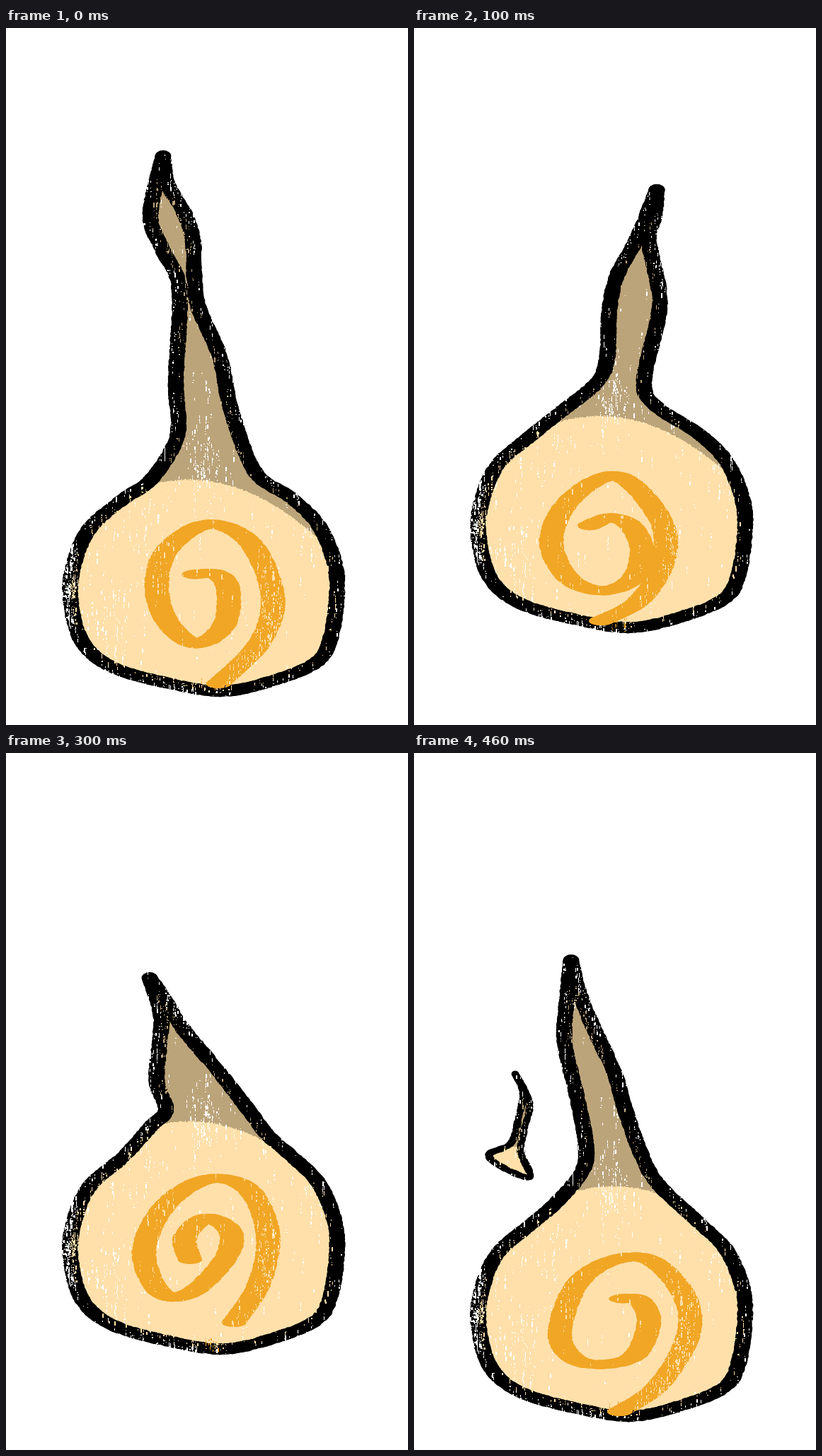
Write an HTML page with a canvas that moves like this. It is 568 px wide and 986 px high and loops after 0.5 s.

```html
<!DOCTYPE html>
<html lang="en">
<head>
<meta charset="utf-8">
<title>Flame</title>
<style>
html, body { margin: 0; width: 100%; height: 100%; overflow: hidden; background: #fff; }
canvas { display: block; }
</style>
</head>
<body>
<canvas id="stage" width="568" height="986"></canvas>
<script>
const W = 568, H = 986, STEP = 100;
const CREAM = '#ffe0aa', TAN = '#bca47a', ORANGE = '#f1a625', INK = '#000';

// Half width and half height of each elliptical brush.
const BODY_NIB = [11, 7.5], WISP_NIB = [5, 4], SPIRAL_NIB = [17, 6];

// All poses share one bowl, moved up by lift, from right shoulder to left.
const bowl = '402,664 442,704 465,760 467,810 458,865 440,896 390,919 310,938 230,927 150,904 107,867 91,805 97,755 119,707 165,667';

// Necks: right side runs down from the tip, left side back up to it.
const poses = [
  {
    lift: 0, light: [258, 638],
    right: '222,181 228,220 252,262 264,300 266,350 272,395 302,465 318,540 352,628',
    left: '203,641 235,595 244,560 240,500 245,370 222,315 204,265 222,181',
    spiral: '300,928 358,870 377,805 345,728 285,702 228,738 213,790 228,840 268,871 308,845 314,795 298,773 266,773'
  },
  {
    lift: 90, light: [262, 548],
    right: '343,229 340,265 332,300 346,370 345,410 325,500 342,535',
    left: '205,545 258,502 273,465 276,400 287,350 315,298 343,229',
    spiral: '264,839 318,810 352,755 348,695 288,634 222,666 194,725 218,778 265,796 308,780 322,738 305,703 276,693 248,704'
  },
  {
    lift: 160, light: [258, 467],
    right: '336,194 349,235 340,285 316,345 311,390 322,430 350,470',
    left: '213,455 226,425 211,350 230,320 270,290 305,245 336,194',
    spiral: '311,741 345,695 355,610 318,532 262,514 190,550 174,610 200,670 250,688 302,666 318,620 300,590 270,585 251,604 257,626',
    wisp: { line: '316,24 343,55 366,100 368,128 343,143 337,157 316,146 316,122 330,90 328,55 316,24', light: [340, 110] }
  },
  {
    lift: 95, light: [258, 520],
    right: '203,318 225,350 250,390 300,450 345,508 370,541',
    left: '205,528 226,505 213,465 217,410 219,370 203,318',
    spiral: '322,806 358,750 370,680 342,617 285,603 225,640 195,705 218,763 262,763 310,715 317,677 283,658 253,685 260,717'
  },
  {
    lift: 0, light: [280, 612],
    right: '222,293 232,335 252,385 283,452 297,500 320,565 345,610',
    left: '200,637 237,593 243,555 230,485 213,410 216,350 222,293',
    spiral: '290,932 345,895 387,825 382,768 335,718 280,718 230,752 206,820 225,856 265,865 312,852 332,805 318,774 292,772',
    wisp: { line: '143,454 163,495 155,535 151,565 164,600 125,586 106,568 137,552 148,515 154,480 143,454', light: [140, 556] }
  }
];

// Worn patches: x, y, spread x, spread y, streak count.
const inkWear = [[90, 780, 7, 40, 170], [240, 928, 60, 12, 80], [150, 668, 30, 22, 50]];
const fillWear = [[278, 620, 14, 35, 65], [150, 850, 22, 38, 75], [436, 710, 9, 24, 25], [180, 690, 35, 25, 30]];
const spiralWear = [[375, 830, 14, 50, 200], [340, 900, 25, 22, 70], [225, 740, 22, 25, 35]];

let seed = 1;
function rand() {
  seed = (seed + 0x6D2B79F5) | 0;
  let t = Math.imul(seed ^ (seed >>> 15), 1 | seed);
  t = (t + Math.imul(t ^ (t >>> 7), 61 | t)) ^ t;
  return ((t ^ (t >>> 14)) >>> 0) / 4294967296;
}
const bell = () => (rand() + rand() + rand() + rand() - 2) * 1.7;

const points = text => text.split(' ').map(p => p.split(',').map(Number));

function layer() {
  const c = document.createElement('canvas');
  c.width = W;
  c.height = H;
  return c.getContext('2d');
}

// Catmull-Rom curve through the key points, sampled about every 2 px.
function smooth(keys) {
  const at = i => keys[Math.max(0, Math.min(keys.length - 1, i))];
  const out = [];
  for (let i = 0; i < keys.length - 1; i++) {
    const [a, b, c, d] = [at(i - 1), at(i), at(i + 1), at(i + 2)];
    const steps = Math.ceil(Math.hypot(c[0] - b[0], c[1] - b[1]) / 2);
    for (let k = 0; k < steps; k++) {
      const t = k / steps;
      out.push([0, 1].map(j => b[j] + 0.5 * t * (c[j] - a[j]
        + t * (2 * a[j] - 5 * b[j] + 4 * c[j] - d[j]
        + t * (3 * (b[j] - c[j]) + d[j] - a[j])))));
    }
  }
  return [...out, at(keys.length)];
}

// A flat nib gives broad verticals, thin horizontals and ragged edges.
function brush(g, line, [rx, ry], color) {
  g.fillStyle = color;
  for (const [x, y] of line) {
    const rough = rand() * 1.6 - 0.8;
    g.beginPath();
    g.ellipse(x, y, rx + rough, ry + rough, 0, 0, 7);
    g.fill();
  }
}

// Broken vertical scratches.
function streak(g, x, y) {
  for (let k = 1 + Math.floor(rand() * 3); k > 0; k--) {
    const h = 1 + Math.floor(rand() * rand() * 8);
    g.fillRect(Math.round(x), Math.round(y), rand() < 0.3 ? 2 : 1, h);
    y += h + 1 + rand() * 4;
    x += rand() - 0.5;
  }
}

function wear(g, zones, spread, lift, key) {
  seed = key;
  g.globalCompositeOperation = 'destination-out';
  for (let i = 0; i < spread; i++) streak(g, 76 + rand() * 408, rand() * H);
  for (const [x, y, sx, sy, n] of zones)
    for (let i = 0; i < n; i++) streak(g, x + bell() * sx, y + bell() * sy - lift);
  g.globalCompositeOperation = 'source-over';
}

function drawShape(out, keys, [lx, ly], nib, lift) {
  const fill = layer(), ink = layer(), line = smooth(keys);

  fill.fillStyle = CREAM;
  fill.beginPath();
  for (const [x, y] of line) fill.lineTo(x, y);
  fill.fill();

  // Tan above a parabolic edge.
  fill.globalCompositeOperation = 'source-atop';
  fill.fillStyle = TAN;
  for (let x = 0; x < W; x++)
    fill.fillRect(x, 0, 1, Math.round(ly + (x - lx) ** 2 / 400 + rand() * 2));
  wear(fill, fillWear, 600, lift, 11);

  brush(ink, line, nib, INK);
  const [tx, ty] = keys[0];
  wear(ink, [...inkWear, [tx + 15, ty + 70 + lift, 28, 65, 130]], 2300, lift, 23);

  out.drawImage(fill.canvas, 0, 0);
  out.drawImage(ink.canvas, 0, 0);
}

function render({ lift, light, right, left, spiral, wisp }, i) {
  const out = layer(), swirl = layer();
  seed = 100 + i;
  out.fillStyle = '#fff';
  out.fillRect(0, 0, W, H);

  const base = points(bowl).map(([x, y]) => [x, y - lift]);
  drawShape(out, [...points(right), ...base, ...points(left)], light, BODY_NIB, lift);
  if (wisp) drawShape(out, points(wisp.line), wisp.light, WISP_NIB, lift);

  brush(swirl, smooth(points(spiral)), SPIRAL_NIB, ORANGE);
  // Dry scrap of paint under the tail.
  for (let k = 0; k < 9; k++) streak(swirl, 288 + bell() * 8, 924 + bell() * 3 - lift);
  wear(swirl, spiralWear, 600, lift, 37);
  out.drawImage(swirl.canvas, 0, 0);
  return out.canvas;
}

const frames = poses.map(render);
const stage = document.getElementById('stage').getContext('2d');
const start = performance.now();

function loop() {
  const t = performance.now() - start;
  stage.drawImage(frames[Math.floor(t / STEP) % frames.length], 0, 0);
  requestAnimationFrame(loop);
}
loop();
</script>
</body>
</html>
```
